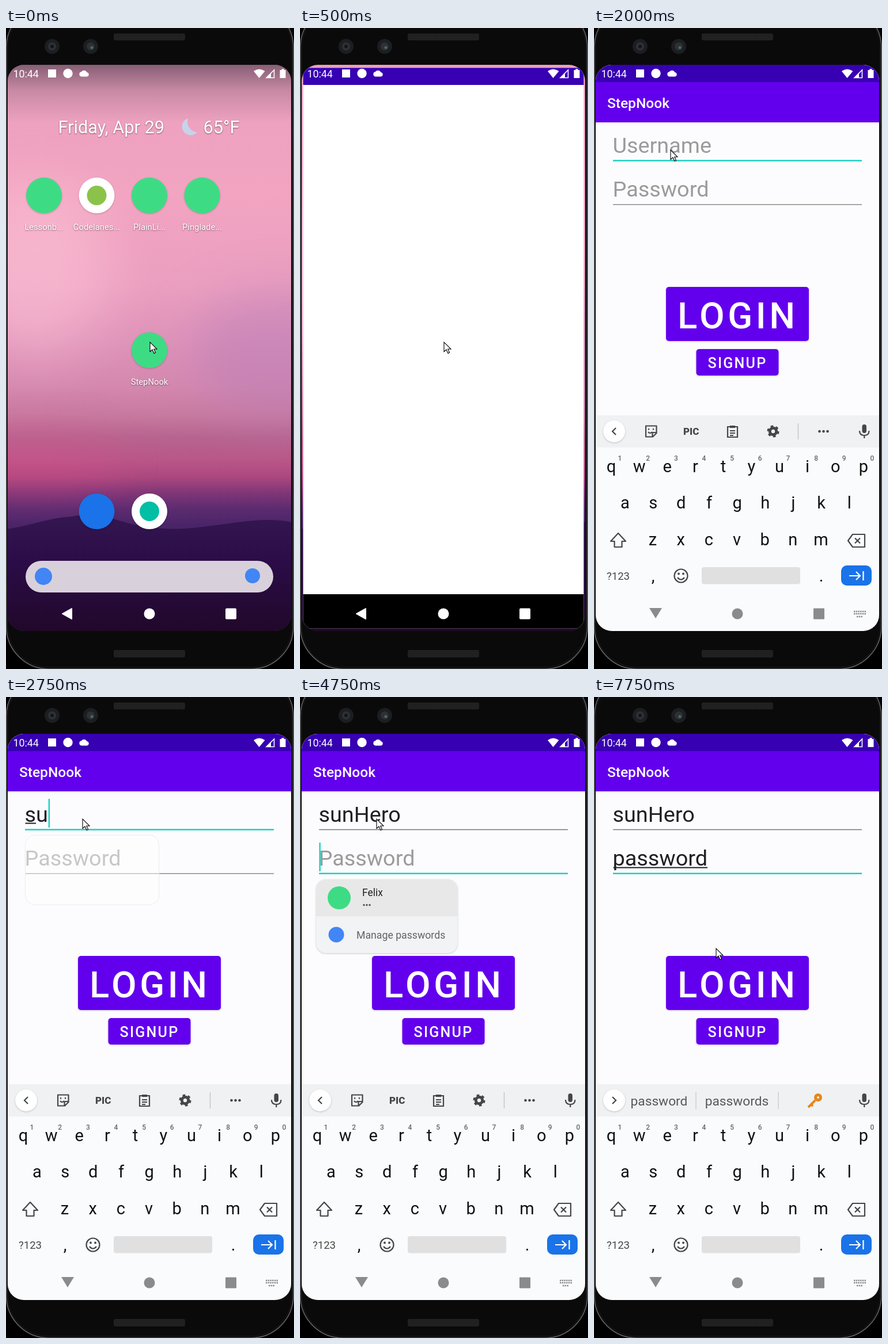
These frames come from a looping animation (500 px wide and 1114 px high, 8000 ms). An HTML page:

```html
<!DOCTYPE html>
<html lang="en">
<head>
<meta charset="utf-8">
<style>
html, body { margin: 0; height: 100%; overflow: hidden; background: #000; }
svg { display: block; width: 100vw; height: 100vh; }
text { font-family: Roboto, sans-serif; white-space: pre; }
.mid { text-anchor: middle; }
.home text { fill: #fff; filter: drop-shadow(0 1px 1px #0007); }
.raised { filter: drop-shadow(0 1px 1.5px #0003); }
.medium { font-weight: 500; fill: #fff; }
.line { fill: none; stroke: #444746; stroke-width: 2.2; }
.field { font-size: 37.8px; fill: #202022; }
.hint { font-size: 37.8px; fill: #9b9b9b; }
.word { font-size: 22.7px; fill: #56585b; text-anchor: middle; }
.glow { filter: blur(45px); }
</style>
</head>
<body>
<svg viewBox="0 0 500 1114" preserveAspectRatio="none">
<defs>
  <clipPath id="screen"><rect x="3" y="64" width="492" height="984" rx="28"/></clipPath>
  <linearGradient id="sky" gradientUnits="userSpaceOnUse" x1="0" y1="64" x2="0" y2="864">
    <stop stop-color="#eaa0bd"/><stop offset=".28" stop-color="#f2a4c1"/>
    <stop offset=".48" stop-color="#eb9fc0"/><stop offset=".6" stop-color="#df93b9"/>
    <stop offset=".7" stop-color="#d588ae"/><stop offset=".76" stop-color="#c87a9f"/>
    <stop offset=".81" stop-color="#b7648f"/><stop offset=".86" stop-color="#b95688"/>
    <stop offset=".895" stop-color="#ac487f"/><stop offset=".93" stop-color="#803677"/>
    <stop offset=".965" stop-color="#5c2b70"/><stop offset="1" stop-color="#4a2468"/>
  </linearGradient>
  <linearGradient id="shade" x2="0" y2="1"><stop stop-color="#3a2c3c" stop-opacity=".56"/><stop offset=".45" stop-color="#3a2c3c" stop-opacity=".2"/><stop offset="1" stop-color="#3a2c3c" stop-opacity="0"/></linearGradient>
  <linearGradient id="hill" x2="0" y2="1"><stop stop-color="#341650"/><stop offset=".4" stop-color="#2b0c48"/><stop offset="1" stop-color="#210829"/></linearGradient>
  <pattern id="mesh" width="3" height="3" patternUnits="userSpaceOnUse"><rect width="3" height="3" fill="#242424"/><rect width="1.5" height="1.5" fill="#151515"/></pattern>
</defs>

<!-- phone body -->
<rect x=".5" y="-40" width="498.500" height="1154" rx="74" fill="#0a0a0a" stroke="#626265" stroke-width="1.600"/>
<rect x="3" y="-37" width="493.500" height="1148" rx="71" fill="none" stroke="#1c1c1e"/>
<rect x="187" y="9.500" width="124" height="12" rx="3" fill="url(#mesh)"/>
<rect x="187" y="1081" width="124" height="13" rx="3" fill="url(#mesh)"/>
<g fill="#1c1e22"><circle cx="80" cy="32" r="13"/><circle cx="147" cy="32" r="13"/></g>
<g fill="#2d3135"><circle cx="80" cy="32" r="7"/><circle cx="147" cy="32" r="7"/></g>
<circle cx="80" cy="32" r="3" fill="#141518"/><circle cx="149" cy="34" r="2.500" fill="#4d6a5c"/>

<g clip-path="url(#screen)">
  <!-- launcher -->
  <g class="home">
    <rect x="3" y="64" width="492" height="984" fill="url(#sky)"/>
    <ellipse class="glow" cx="50" cy="420" rx="130" ry="150" fill="#ffc6d8" opacity=".5"/>
    <ellipse class="glow" cx="480" cy="570" rx="160" ry="110" fill="#b87db8" opacity=".5"/>
    <ellipse class="glow" cx="50" cy="755" rx="150" ry="30" fill="#e0508a" opacity=".5"/>
    <path fill="url(#hill)" d="M0 871C40 866 70 852 115 849C150 841 175 850 200 857C240 870 290 874 340 867C400 860 455 848 500 860V1050H0Z"/>
    <g id="launcher">
      <rect x="3" y="64" width="492" height="100" fill="url(#shade)"/>
      <text x="90.500" y="183" font-size="30.700">Friday, Apr 29</text>
      <text x="342.500" y="183" font-size="30.700">65°F</text>
      <path d="M316 157A15 15 0 1 0 332 181A18 18 0 0 1 316 157Z" fill="#c5d4ea"/>
      <g id="apps"></g>
      <rect x="34" y="926" width="430" height="55" rx="27.500" fill="#d8d1db"/>
      <circle cx="65" cy="953" r="15" fill="#4285f4"/><circle cx="428" cy="952" r="13" fill="#4285f4"/>
    </g>
  </g>

  <!-- app window -->
  <g id="win">
    <rect id="page" x="3" y="64" width="492" height="984"/>
    <rect x="3" y="64" width="492" height="30" fill="#3700b3"/>
    <rect x="3" y="988" width="492" height="60" fill="#000"/>
    <g id="login">
      <rect x="3" y="94" width="492" height="70" fill="#6200ee"/>
      <text class="medium" x="23" y="139" font-size="24.500">StepNook</text>
      <text id="userHint" class="hint" x="32.500" y="217">Username</text>
      <text id="passHint" class="hint" x="32.500" y="293">Password</text>
      <text id="user" class="field" x="32.500" y="217"></text>
      <text id="pass" class="field" x="32.500" y="293"></text>
      <path id="userMark" stroke="#202022" stroke-width="2"/>
      <path id="passMark" stroke="#202022" stroke-width="2"/>
      <path id="userLine" d="M33 230.500H465"/>
      <path id="passLine" d="M33 306.800H465"/>
      <path id="caret" stroke="#12d3c2" stroke-width="2.400"/>
      <g class="raised" fill="#6200ee"><rect x="125" y="450" width="248" height="94" rx="5"/><rect x="177.500" y="558" width="143" height="46" rx="5"/></g>
      <text class="medium" x="145" y="522" font-size="63.200" letter-spacing="5.640">LOGIN</text>
      <text class="medium" x="197.500" y="591" font-size="25.100" letter-spacing="2.240">SIGNUP</text>
      <g id="popup">
        <rect class="raised" x="28" y="317" width="245.500" height="128" rx="17" fill="#f1f3f4"/>
        <path d="M28 381V334a17 17 0 0 1 17-17H256.500a17 17 0 0 1 17 17V381Z" fill="#e8e8e8"/>
        <circle cx="68" cy="349" r="20" fill="#3ddc84"/>
        <text x="108" y="346" font-size="17.500" fill="#202124">Felix</text>
        <g fill="#555"><circle cx="111" cy="361.500" r="1.700"/><circle cx="116" cy="361.500" r="1.700"/><circle cx="121" cy="361.500" r="1.700"/></g>
        <circle cx="63" cy="413" r="13.500" fill="#4285f4"/>
        <text x="98" y="420" font-size="17.700" fill="#5f6368">Manage passwords</text>
      </g>
      <rect id="ghost" x="33.500" y="240" width="232" height="121" rx="17" fill="#fdfdfd" fill-opacity=".45" stroke="#ececee"/>
    </g>
  </g>

  <g id="nav" fill="#fff" stroke-linejoin="round">
    <path d="M98 1018L114 1009V1027Z" stroke="#fff" stroke-width="2"/>
    <circle cx="249" cy="1018" r="9.500"/><rect x="381" y="1008.500" width="19" height="19" rx="2"/>
  </g>

  <!-- keyboard -->
  <g id="keyboard">
    <rect x="3" y="673" width="492" height="375" fill="#f9fbfd"/>
    <rect x="3" y="673" width="492" height="56" fill="#eff1f3"/>
    <circle class="raised" cx="35" cy="701" r="19" fill="#fff"/>
    <path id="chevron" class="line"/>
    <g id="tools">
      <path class="line" d="M90 691.500H108.500V704L102 710.500H90ZM108.500 703H101.500V710M94 702Q97 706 101 702M95 696V698.500M103 696V698.500" stroke-linejoin="round"/>
      <text x="155" y="707" font-size="17" font-weight="900" fill="#444746">PIC</text>
      <path class="line" d="M232 693H249V711H232ZM236 700H245M236 704H245M236 708H242M237 692H244V694H237Z"/>
      <circle cx="311" cy="701" r="5.700" class="line" style="stroke-width:5"/>
      <circle cx="311" cy="701" r="8.800" class="line" style="stroke-width:3.500" stroke-dasharray="4.600 4.615"/>
      <path d="M354.500 687V715" stroke="#c4c7ca" stroke-width="1.500"/>
      <g fill="#444746"><circle cx="391.500" cy="701" r="2.300"/><circle cx="398.500" cy="701" r="2.300"/><circle cx="405.500" cy="701" r="2.300"/></g>
    </g>
    <g id="words">
      <path d="M177 686V716M320 686V716" stroke="#c9cbce" stroke-width="1.300"/>
      <text class="word" x="113" y="710"></text><text class="word" x="248" y="710"></text><text class="word" x="382" y="710"></text>
      <g id="key" stroke="#e6861a" fill="none"><circle cx="389" cy="696" r="4.500" stroke-width="5"/><path d="M384 701L372 713M376 707L380 711" stroke-width="4"/></g>
    </g>
    <rect x="465.500" y="689" width="7.500" height="15" rx="3.700" fill="#444746"/>
    <path class="line" d="M461 700Q461 708 469.300 708T477.500 700M469.300 708V713"/>
    <g id="keys" class="mid" font-size="29" fill="#111"></g>
    <path class="line" d="M42 878L55 892H48.500V902H35.500V892H29Z" stroke-linejoin="round"/>
    <path class="line" d="M449 880H470V902H449L441 891ZM453 886.500L462 895.500M462 886.500L453 895.500" stroke-linejoin="round"/>
    <text class="mid" x="42" y="958.500" font-size="18.500" fill="#444746">?123</text>
    <circle class="line" cx="151" cy="952" r="11.500"/>
    <path class="line" d="M145 955Q151 962 157 955"/><g fill="#444746"><circle cx="147" cy="948.500" r="1.900"/><circle cx="155" cy="948.500" r="1.900"/></g>
    <rect x="187" y="937" width="171" height="29.500" rx="4" fill="#e0e0e0"/>
    <rect x="429" y="934" width="53" height="35" rx="10" fill="#1a73e8"/>
    <path d="M443 952H462M455 945L462 952L455 959M467.500 944V960" fill="none" stroke="#fff" stroke-width="2.200"/>
    <g fill="#8a8b8d">
      <path d="M96 1008H118L107 1026Z"/><circle cx="249" cy="1018" r="9.500"/><rect x="381" y="1008.500" width="19" height="19" rx="1"/>
      <path d="M451 1014H472M451 1018H472M456 1023H467" stroke="#8a8b8d" stroke-width="2.500" stroke-dasharray="2.500 1.200"/>
    </g>
  </g>

  <!-- status bar -->
  <g fill="#fff">
    <text x="12.500" y="86" font-size="17.800">10:44</text>
    <rect x="73" y="72" width="14" height="14"/><circle cx="107.500" cy="79" r="8.200"/>
    <path d="M131 84.500a4.300 4.300 0 0 1 0-8.500a5.500 5.500 0 0 1 9.500 1a3.800 3.800 0 0 1 0 7.500Z"/>
    <path d="M430 75Q439.500 68 449.500 75L439.500 87Z"/>
    <path d="M452 86.500L465.500 73V86.500Z" fill="none" stroke="#fff" stroke-width="1.600"/><path d="M451 87L460 78V87Z"/>
    <path d="M475.500 73H478.500V71H482.500V73H485.500V87H475.500Z"/>
  </g>
</g>
<path id="mouse" d="M0 0V16.500L4 13L7 19.500L9.500 18.300L6.800 12H12Z" fill="#fff" stroke="#000" stroke-width="1.100"/>
</svg>

<script>
const STEP = 250, LOOP = 8000;
const USER = 'sunHero', PASS = 'password';
const $ = id => document.getElementById(id);
const show = (id, on) => $(id).style.display = on ? '' : 'none';
const attr = (id, name, value) => $(id).setAttribute(name, value);
const clamp = (v, lo, hi) => Math.max(lo, Math.min(hi, v));

const app = (x, y, fill, name = '', mark = '') => {
  const dot = mark && `<circle cx="${x}" cy="${y}" r="17" fill="${mark}"/>`;
  $('apps').innerHTML += `<circle class="raised" cx="${x}" cy="${y}" r="31" fill="${fill}"/>${dot}
    <text class="mid" x="${x}" y="${y + 59.5}" font-size="14.8">${name}</text>`;
};
app(66, 291, '#3ddc84', 'Lessonb...');
app(157.5, 291, '#fff', 'Codelanes...', '#8bc34a');
app(249, 291, '#3ddc84', 'PlainLi...');
app(340.5, 291, '#3ddc84', 'Pinglade...');
app(249, 560, '#3ddc84', 'StepNook');
app(157.5, 840, '#1a73e8');
app(249, 840, '#fff', '', '#00bfa5');

const row = (letters, x, y, digits = '') => [...letters].forEach((c, i) => {
  const cx = x + i * 48.65;
  $('keys').innerHTML += `<text x="${cx}" y="${y}">${c}</text>` + (digits &&
    `<text x="${cx + 15}" y="752" font-size="12" font-weight="500" fill="#666">${digits[i]}</text>`);
});
row('qwertyuiop', 30, 772, '1234567890');
row('asdfghjkl', 54, 835);
row('zxcvbnm', 102, 899);
row(',', 102.5, 962);
row('.', 394.5, 962);

const userLen = i => i < 11 ? 0 : [2, 3, 4, 5, 5, 6, 7][Math.min(i - 11, 6)];
const passLen = i => clamp(i - 21, 0, 8);
// The composing underline trails the typing by one letter.
const marked = (len, i) => len(i) === len(i - 1) ? len(i) : len(i) - 1;
const widthOf = (id, n) => n > 0 ? $(id).getSubStringLength(0, n) : 0;

function mousePos(i) {
  if (i < 5) return [250, 546];
  if (i === 5) return [195, 390];
  if (i < 30) return [133, 212];
  return i === 30 ? [130, 230] : [212, 437];
}

function drawField(id, word, len, i, y, focused) {
  const n = len(i), under = focused ? marked(len, i) : 0;
  $(id).textContent = word.slice(0, n);
  show(id + 'Hint', !n);
  attr(id + 'Mark', 'd', under > 0 ? `M33.5 ${y}H${32.5 + widthOf(id, under)}` : '');
  attr(id + 'Line', 'stroke', focused ? '#1bcfc1' : '#757575');
  attr(id + 'Line', 'stroke-width', focused ? 2.6 : 1.3);
}

function drawStrip(i, onPass) {
  const len = onPass ? passLen : userLen;
  const typed = (onPass ? PASS : USER).slice(0, Math.max(0, marked(len, i)));
  const suggesting = len(i) > 2 && i !== 18;
  const done = onPass && typed.length > 6;
  const words = done ? [PASS, 'passwords', ''] : [typed, ...(onPass ? [PASS, 'pass'] : ['sunset', 'sunny'])];
  show('tools', !suggesting);
  show('words', suggesting);
  show('key', done);
  document.querySelectorAll('.word').forEach((el, k) => el.textContent = words[k]);
  attr('chevron', 'd', suggesting ? 'M32 695L38 701L32 707' : 'M38 695L32 701L38 707');
}

function draw(i) {
  const onUser = i >= 7 && i < 18, onPass = i >= 18;
  const scale = [0, .55, .99][i] ?? 1;
  show('launcher', i < 2);
  show('win', i > 0);
  attr('win', 'transform', `translate(249 590) scale(${scale}) translate(-249 -590)`);
  attr('page', 'fill', i < 7 ? '#fff' : '#fcfcfe');
  show('login', i >= 4);
  show('nav', i < 7);

  drawField('user', USER, userLen, i, 219.5, onUser);
  drawField('pass', PASS, passLen, i, 296.5, onPass);
  const id = onPass ? 'pass' : 'user', top = onPass ? 253 : 177;
  const caretX = 34.5 + widthOf(id, $(id).textContent.length);
  attr('caret', 'd', `M${caretX} ${top}v50`);
  show('caret', i >= 7 && ![8, 20, 31].includes(i));

  const userPopup = i === 9 || i === 10;
  show('popup', userPopup || i >= 19 && i <= 21);
  attr('popup', 'transform', `translate(0 ${userPopup ? -76 : 0})`);
  show('ghost', i === 11 || i === 22);
  attr('ghost', 'transform', `translate(0 ${i === 22 ? 76 : 0})`);

  show('keyboard', i >= 7);
  attr('keyboard', 'transform', `translate(0 ${i === 7 ? 110 : 0})`);
  drawStrip(i, onPass);
  attr('mouse', 'transform', `translate(${mousePos(i)})`);
}

const start = performance.now();
let last = -1;
function tick() {
  const i = Math.floor((performance.now() - start) % LOOP / STEP);
  if (i !== last) draw(last = i);
  requestAnimationFrame(tick);
}
tick();
</script>
</body>
</html>
```
